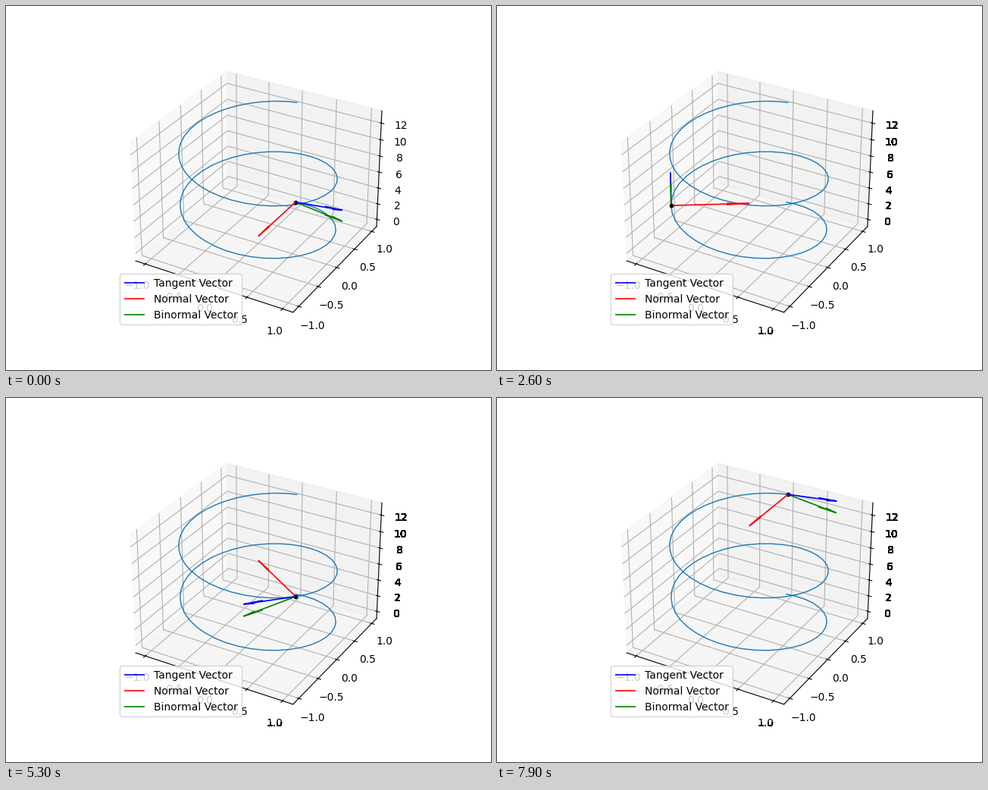
Write a matplotlib script that moves like this. It is 640 by 480 pixels and loops after 8000 ms.

```python
import numpy as np
import matplotlib.pyplot as plt
from matplotlib.animation import FuncAnimation
from matplotlib.text import Text
from matplotlib.transforms import Bbox

FRAMES = 80
INTERVAL = 100
Z_MAX = 4 * np.pi

fig = plt.figure(figsize=(6.4, 4.8), dpi=100)
ax = fig.add_subplot(projection="3d")

t = np.linspace(0, Z_MAX, FRAMES)
ax.plot(np.sin(t), np.cos(t), t, lw=1)
ax.autoscale(False)
z_pad = Z_MAX * (0.05 + 1.1 / 48)
ax.set_zlim(-z_pad, Z_MAX + z_pad)


class Overdrawn(Text):
    """Text painted several times on one spot, so its soft edges build up."""
    passes = 0

    def draw(self, renderer):
        for _ in range(self.passes):
            super().draw(renderer)


def frenet_frame(s):
    """Point on the helix with its unit tangent, normal and binormal."""
    point = np.array([np.sin(s), np.cos(s), s])
    tangent = np.array([np.cos(s), -np.sin(s), 1]) / np.sqrt(2)
    normal = np.array([-np.sin(s), -np.cos(s), 0])
    return point, tangent, normal, np.cross(tangent, normal)


def draw_vectors(s):
    point, *vectors = frenet_frame(s)
    styles = zip(vectors, ("blue", "red", "green"), ("Tangent", "Normal", "Binormal"))
    artists = [ax.quiver(*point, *v, color=color, lw=1.2, label=f"{name} Vector")
               for v, color, name in styles]
    artists.append(ax.scatter(*point, s=10, color="black", depthshade=False))
    return artists


def overdraw_labels(axis, clip):
    """Overdrawn copies of an axis' tick labels, limited to the clip box."""
    lo, hi = axis.get_view_interval()
    copies = []
    for tick in axis.get_major_ticks():
        label = tick.label1
        if lo <= tick.get_loc() <= hi:
            x, y = ax.transData.transform(label.get_position())
            copy = Overdrawn(x, y, label.get_text(), fontsize=label.get_fontsize(),
                             ha=label.get_ha(), va=label.get_va())
            fig.add_artist(copy)
            copy.set_transform(None)
            copy.set_clip_box(clip)
            copy.set_clip_on(True)
            copies.append(copy)
    return copies


moving = draw_vectors(t[0])
ax.legend(loc="lower left")
fig.canvas.draw()

# Labels gain weight only where they stick out of the axes box.
width, height = fig.bbox.size
below = Bbox.from_extents(0, 0, width, np.ceil(ax.bbox.y0))
right = Bbox.from_extents(np.floor(ax.bbox.x1), 0, width, height)
heavy = overdraw_labels(ax.xaxis, below) + overdraw_labels(ax.zaxis, right)


def update(i):
    for artist in moving:
        artist.remove()
    moving[:] = draw_vectors(t[i])
    for label in heavy:
        label.passes = min(i, 20)
    return moving + heavy


anim = FuncAnimation(fig, update, frames=FRAMES, interval=INTERVAL,
                     repeat=True, repeat_delay=0, blit=False)
plt.show()
```
